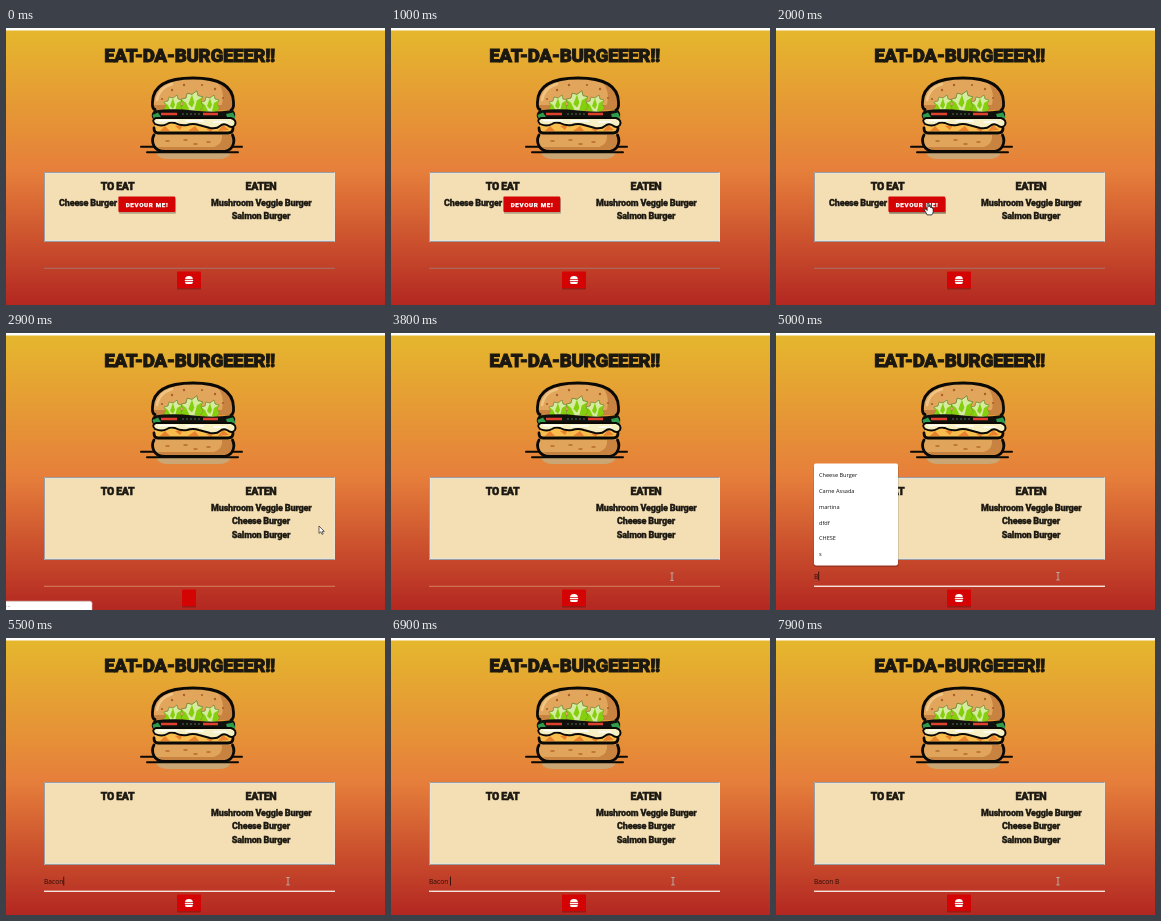
Animation, 379 px wide and 277 px high, one loop 8 s. Source, as an HTML page:

```html
<!DOCTYPE html>
<html lang="en">
<head>
<meta charset="utf-8">
<title>Burger list</title>
<style>
  html, body { margin: 0; width: 100%; height: 100%; overflow: hidden; }
  svg { display: block; width: 100vw; height: 100vh; }
  text { white-space: pre; }
  .heavy { font-family: Roboto, "Open Sans", sans-serif; font-weight: 900; fill: #1b1811; stroke: #1b1811; text-anchor: middle; }
  .title { font-size: 18.8px; letter-spacing: -.38px; stroke-width: .85; }
  .head { font-size: 10.5px; letter-spacing: -.3px; stroke-width: .5; }
  .item { font-size: 9px; letter-spacing: -.18px; stroke-width: .35; }
  .label { font-size: 6.2px; letter-spacing: .65px; fill: #fff; stroke: #fff; stroke-width: .25; }
  .plain { font-family: "Open Sans", "Noto Sans", sans-serif; }
  .ink { fill: none; stroke: #0a0906; stroke-width: 2.8; stroke-linecap: round; stroke-linejoin: round; }
</style>
</head>
<body>
<svg viewBox="0 0 379 277" preserveAspectRatio="none">
  <defs>
    <linearGradient id="sky" gradientUnits="userSpaceOnUse" x1="0" y1="0" x2="0" y2="285">
      <stop offset="0" stop-color="#e5b82d"/>
      <stop offset=".5" stop-color="#e67f3b"/>
      <stop offset="1" stop-color="#b02220"/>
    </linearGradient>
    <clipPath id="dome"><path d="M146 82V73C147 57 162 49.5 187 49.5S227 57 228 73V82Z"/></clipPath>
  </defs>
  <rect width="379" height="277" fill="#fff"/>
  <rect y="2.5" width="379" height="274.5" fill="url(#sky)"/>
  <text class="heavy title" x="183.5" y="33.7">EAT-DA-BURGEEER!!</text>

  <g id="burger">
    <path d="M150 125H225Q222 131 212 131H162Q153 131 150 125Z" fill="#c9a673"/>
    <g clip-path="url(#dome)">
      <rect x="145" y="48" width="86" height="36" fill="#e2a55c"/>
      <path d="M205 48Q224 62 213 84H232V48Z" fill="#c98340"/>
      <path d="M145 77H230V84H145Z" fill="#c98340"/>
      <path d="M151 72Q153 60 166 56" fill="none" stroke="#f0c583" stroke-width="2.5" stroke-linecap="round"/>
    </g>
    <g fill="#a9602c">
      <circle cx="166" cy="62" r="1.2"/><circle cx="178" cy="57" r="1.2"/>
      <circle cx="196" cy="57" r="1.1"/><circle cx="209" cy="61" r="1.2"/>
      <circle cx="217" cy="70" r="1.1"/><circle cx="156" cy="71" r="1.1"/>
    </g>
    <path class="ink" d="M149 81.5Q146 81 146.5 74C147 57 162 50 187 50S227 57 227.5 74Q228 81 225 82"/>
    <g id="leaves"></g>
    <path d="M148 82.5Q167 80 187 82.5T227 82Q231 86 228 91H147Q144 87 148 82.5Z" fill="#10110c"/>
    <path d="M146.5 87L152 84.5L155 89L148 91ZM220 86L227 84.5L229.5 90L222 92Z" fill="#2f9c4c"/>
    <path d="M155 86H171M197 86H212" stroke="#e0402c" stroke-width="2.6"/>
    <path d="M176 86H194" stroke="#586b58" stroke-width="1.2" stroke-dasharray="2 2"/>
    <path d="M149 94H226V104H149Z" fill="#f8bd4c"/>
    <path d="M154 103L159 98L164 103ZM169 98L177 97L174 102ZM182 103L189 98L193 103ZM200 101L207 100L205 104ZM212 103L217 97L223 102Z" fill="#ea812e"/>
    <path d="M150 90H225Q231 92 229 97Q226 101 221 97Q217 95 214 98Q211 101 204 100L193 97Q187 95 181 97Q174 98 169 95Q164 94 161 96Q156 99 149 96Q145 92 150 90Z" fill="#f6f0c4" stroke="#0a0906" stroke-width="1.9"/>
    <path d="M153 92.5H171M180 93H197M208 94H220" stroke="#fff" stroke-width="1.5" stroke-linecap="round"/>
    <path d="M148 106H226Q229 113 226 119Q223 123 216 123H159Q151 123 148 118Q145 111 148 106Z" fill="#e0a45b"/>
    <path d="M216 107H226Q229 113 226 119Q223 123 216 123H159L151 119H208Q217 116 216 107Z" fill="#c98340"/>
    <path d="M160 113h3M178 112h3M201 114h3M188 116h3" stroke="#b8682f" stroke-width="1.4" stroke-linecap="round"/>
    <path class="ink" d="M148 100Q148 105 152 105H222Q227 105 227 100M148 107Q145 112 148 118Q151 123.5 159 123.5H216Q223 123.5 226 119Q229.5 113 226.5 107"/>
    <path class="ink" style="stroke-width:2" d="M135 118.7H148M227 118.7H236M141 124.3H232"/>
  </g>

  <g id="panel">
    <rect id="box" x="38" y="144" width="291" fill="#f4dfb4"/>
    <path id="dark" fill="none" stroke="#9b9da2"/>
    <path id="light" fill="none" stroke="#e9e3d6"/>
  </g>
  <text class="heavy head" x="111.5" y="161.6">TO EAT</text>
  <text class="heavy head" x="255" y="161.6">EATEN</text>
  <g id="todo">
    <text class="heavy item" x="82" y="178.3">Cheese Burger</text>
    <rect id="glow" x="113" y="170" width="57" height="15.8" rx="1" fill="#000" opacity=".28"/>
    <rect x="112.4" y="168.4" width="56.8" height="15.6" rx="1" fill="#d50404"/>
    <text class="heavy label" x="141" y="178.6">DEVOUR ME!</text>
  </g>
  <text class="heavy item" x="255.3" y="178.3">Mushroom Veggie Burger</text>
  <text id="moved" class="heavy item" x="255" y="191.3">Cheese Burger</text>
  <text id="salmon" class="heavy item" x="255" y="191.3">Salmon Burger</text>

  <g id="form">
    <rect id="line" x="38" y="239.8" width="291" height=".9"/>
    <rect id="focus" x="38" y="239.7" width="291" height="1.1" fill="#fff"/>
    <rect id="drop" y="245" height="16.4" rx="1" fill="#000" opacity=".25"/>
    <rect id="send" y="243.6" height="16.6" rx="1" fill="#d50404"/>
    <g id="icon" fill="#fff">
      <path d="M179 251.2Q179.3 248 183 248T186.9 251.2Z"/>
      <rect x="178.7" y="251.9" width="8.6" height="1.2" rx=".6"/>
      <path d="M179 253.8H186.9Q186.9 256 185.3 256H180.6Q179 256 179 253.8Z"/>
    </g>
  </g>
  <text id="typed" class="plain" x="38" y="245.8" font-size="6.7" fill="#2b0c09"></text>
  <rect id="caret" y="238.6" width=".8" height="9" fill="#1c0807"/>

  <g id="popup">
    <rect x="37.6" y="131" width="85" height="103" rx="2" fill="#000" opacity=".2"/>
    <rect x="38" y="130.4" width="84" height="102" rx="1.8" fill="#fff"/>
  </g>
  <g id="status">
    <path d="M-1 268.2H84Q86 268.2 86 270.2V278H-1Z" fill="#fff" stroke="#c9c5c2" stroke-width=".6"/>
    <text class="plain" x="0" y="274.4" font-size="5.5" fill="#666">...</text>
  </g>

  <path id="arrow" d="M0 0V7.4L1.8 5.8L3 8.4L4.2 7.8L3.1 5.4H5.3Z" fill="#fff" stroke="#222" stroke-width=".7"/>
  <path id="hand" d="M-.9 1Q0-.6 .9 1V4.6Q2-.2 2.5 5Q3.6 4 4 5.7Q5.2 4.8 5.2 6.6V9.2Q5 11 3.8 12.4H-.9Q-2 10-3.8 7.3Q-3.6 5.8-2.2 6.7L-.9 8Z" fill="#fff" stroke="#111" stroke-width=".8"/>
  <path id="beam" d="M-1.7 0H1.7M0 0V7.4M-1.7 7.4H1.7" fill="none" stroke="#b9aaa4" stroke-width="1"/>
</svg>
<script>
const LOOP = 8000, STEP = 100;
const NS = "http://www.w3.org/2000/svg";
const el = id => document.getElementById(id);
const set = (id, attrs) => { for (const k in attrs) el(id).setAttribute(k, attrs[k]); };
const show = (id, on) => set(id, { visibility: on ? "visible" : "hidden" });
const within = (t, a, b) => t >= a && t < b;
const clamp = v => Math.max(0, Math.min(1, v));

function add(parent, tag, attrs, text = "") {
  const node = document.createElementNS(NS, tag);
  for (const k in attrs) node.setAttribute(k, attrs[k]);
  node.textContent = text;
  el(parent).append(node);
}

["Cheese Burger", "Carne Assada", "martina", "dfdf", "CHESE", "s"].forEach((word, i) =>
  add("popup", "text", { class: "plain", x: 43, y: 144.1 + 15.8 * i, "font-size": 5.6, fill: "#111" }, word));

// Lettuce clumps: a pale ragged leaf with bright green folds.
for (const [x, y, s] of [[167, 83, 1], [204, 83, 1], [186, 82, 1.2]]) {
  const transform = `translate(${x} ${y}) scale(${s})`;
  add("leaves", "path", { transform, fill: "#d5eba0", stroke: "#3d6a12", "stroke-width": .5,
    d: "M-6 1L-9-2L-7-5L-9-9L-5-10L-4-14L0-13L4-16L5-12L9-11L7-7L9-3L6 1Z" });
  add("leaves", "path", { transform, fill: "#85cf0d",
    d: "M-6 1L-9-2L-7-5L-9-9L-5-6L-2 0ZM6 1L9-3L7-7L9-11L4-8L2 0ZM-3-5L0-13L2-6L0-2Z" });
}

// Pointer stops: time, x, y of the tip.
const path = [
  [1100, 345, 285], [1800, 152, 174.5], [2100, 152, 174.5], [2400, 238, 182],
  [2700, 310, 188], [2900, 313, 193], [3100, 313, 193], [3700, 281, 240],
  [4200, 281, 240], [4300, 282, 239.5]
];
function pointer(t) {
  const i = path.findIndex(p => p[0] > t);
  if (i < 0) return path[path.length - 1].slice(1);
  if (i === 0) return path[0].slice(1);
  const [t0, x0, y0] = path[i - 1], [t1, x1, y1] = path[i];
  const k = (t - t0) / (t1 - t0);
  return [x0 + (x1 - x0) * k, y0 + (y1 - y0) * k];
}

const keyTimes = [5000, 5200, 5300, 5400, 5500, 6900, 7100];

function draw(t) {
  const eaten = t >= 2300, loaded = !within(t, 2300, 3200);
  const bottom = eaten ? 227 : 214;
  set("box", { height: bottom - 144 });
  set("dark", { d: `M38.5 ${bottom - .5}V144.5H328.5M328.5 ${bottom - .5}H38.5` });
  set("light", { d: `M39.5 ${bottom - 1.5}V145.5H328M39 ${bottom - 1.5}H328.3V145` });
  show("todo", !eaten);
  show("moved", eaten);
  set("salmon", { y: eaten ? 204.6 : 191.3 });

  set("form", { transform: `translate(0 ${eaten ? 13 : 0})` });
  set("line", { fill: eaten ? "#d98566" : "#a37870" });
  set("focus", { opacity: clamp((t - 4200) / 300) });
  const half = loaded ? 12 : 7;
  for (const id of ["send", "drop"]) set(id, { x: 183 - half, width: 2 * half });
  show("icon", loaded);
  show("status", within(t, 2200, 3200));
  show("popup", within(t, 4500, 5100));

  const typed = el("typed");
  typed.textContent = "Bacon B".slice(0, keyTimes.filter(k => t >= k).length);
  set("caret", { x: 38 + typed.getComputedTextLength() });
  show("caret", within(t, 4300, 4800) || within(t, 5000, 6000) || within(t, 6500, 7600));

  const [x, y] = pointer(t);
  const kind = t >= 3600 ? "beam" : within(t, 1700, 2200) ? "hand" : "arrow";
  for (const id of ["arrow", "hand", "beam"]) {
    show(id, id === kind);
    set(id, { transform: `translate(${x} ${y})` });
  }
  set("glow", { opacity: kind === "hand" ? .42 : .28 });
}

const start = performance.now();
function tick() {
  const t = (performance.now() - start) % LOOP;
  draw(Math.floor(t / STEP) * STEP);
  requestAnimationFrame(tick);
}
tick();
</script>
</body>
</html>
```
